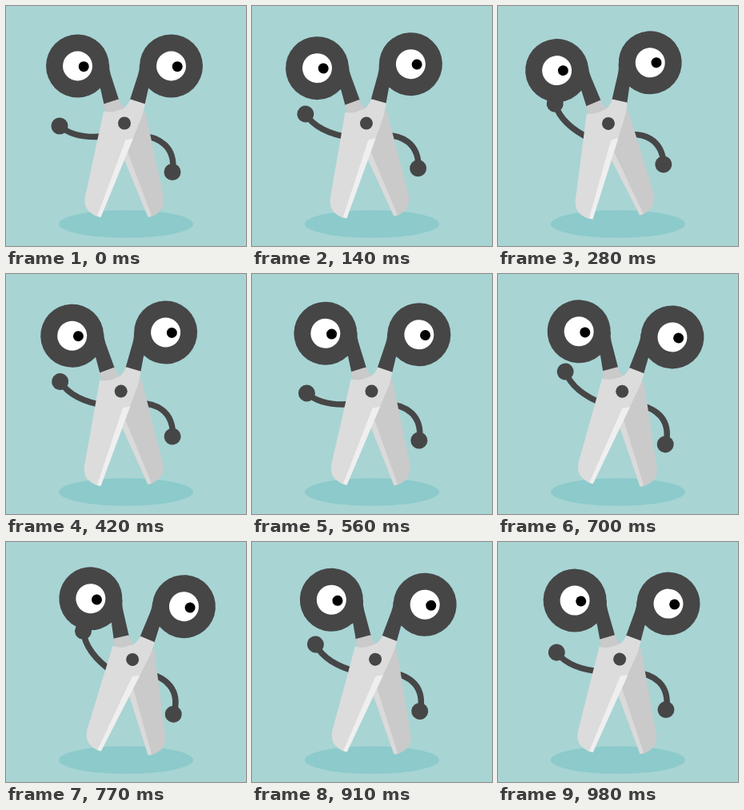
Animation of 300x300 px, one loop 1050 ms. Source, as an HTML page:

```html
<!DOCTYPE html>
<html>
<head>
<meta charset="utf-8">
<style>
html, body { margin: 0; width: 100%; height: 100%; overflow: hidden; background: #a8d4d4; }
svg { display: block; width: 100%; height: 100%; }
.arm path { fill: none; stroke: #464646; stroke-width: 7.5; }
.dark, .arm circle { fill: #464646; }
</style>
</head>
<body>
<svg viewBox="0 0 300 300">
  <defs>
    <path id="blade" d="M155.5 116.5L174 122.5L170 138L158.5 166L118.5 264Q112 264 103.500 256.500Q97.500 251 98.800 239L120 141L122 131.500Q133 134.500 142 129.500Q150 129 155.500 116.500Z"/>
    <path id="edge" d="M149.500 167.500L159 165.500L118.500 264L114 262.500Z"/>
    <g id="handle">
      <circle cx="89.5" cy="75" r="39.5"/>
      <path d="M105 70L129 73Q129 80 131 86L141 117L122.500 123L118 103L100 95Z"/>
    </g>
    <g id="eye">
      <circle cx="89.500" cy="75" r="18.500" fill="#fff"/>
      <circle cx="97.200" cy="75.700" r="6.500"/>
    </g>
  </defs>
  <ellipse cx="150" cy="272.5" rx="84" ry="17.3" fill="#8ccacb"/>
  <g id="body">
    <g id="left" class="arm">
      <path d="M67 150Q88 168 130 162"/>
      <circle cx="67" cy="150" r="10.5"/>
    </g>
    <g id="right" class="arm">
      <path d="M166 162C192 163 212 176 208.500 207"/>
      <circle cx="208" cy="207.500" r="10.500"/>
    </g>
    <use href="#handle" class="dark"/>
    <use href="#handle" class="dark" transform="matrix(-1 0 0 1 296 0)"/>
    <g transform="matrix(-1 0 0 1 296 0)">
      <use href="#blade" fill="#cacaca"/>
      <use href="#edge" fill="#dadada"/>
    </g>
    <use href="#blade" fill="#dcdcdc"/>
    <use href="#edge" fill="#efefef"/>
    <circle cx="148" cy="146.500" r="8" class="dark"/>
    <use href="#eye"/>
    <use href="#eye" x="117"/>
  </g>
</svg>
<script>
const STEP = 70, STEPS = 15;

// Each part turns about its pivot through [step, degrees] keys.
const parts = [
  { id: "body", pivot: "148 266", keys: [[0, 0], [4, -4.82], [11, 4.85], [15, 1]] },
  { id: "left", pivot: "124 157", keys: [[0, 0], [4, 38.3], [8, 0], [11, 38.3], [15, 0]] },
  { id: "right", pivot: "170 165", keys: [[0, 0], [4, -6.2], [11, 4.3], [15, -1.4]] }
];

function angleAt(keys, step) {
  const i = keys.findIndex(k => k[0] > step);
  const [t0, a0] = keys[i - 1], [t1, a1] = keys[i];
  return a0 + (a1 - a0) * (step - t0) / (t1 - t0);
}

const start = performance.now();

function draw() {
  const step = Math.floor((performance.now() - start) / STEP) % STEPS;
  for (const { id, pivot, keys } of parts) {
    document.getElementById(id).setAttribute("transform", `rotate(${angleAt(keys, step)} ${pivot})`);
  }
  requestAnimationFrame(draw);
}
draw();
</script>
</body>
</html>
```
